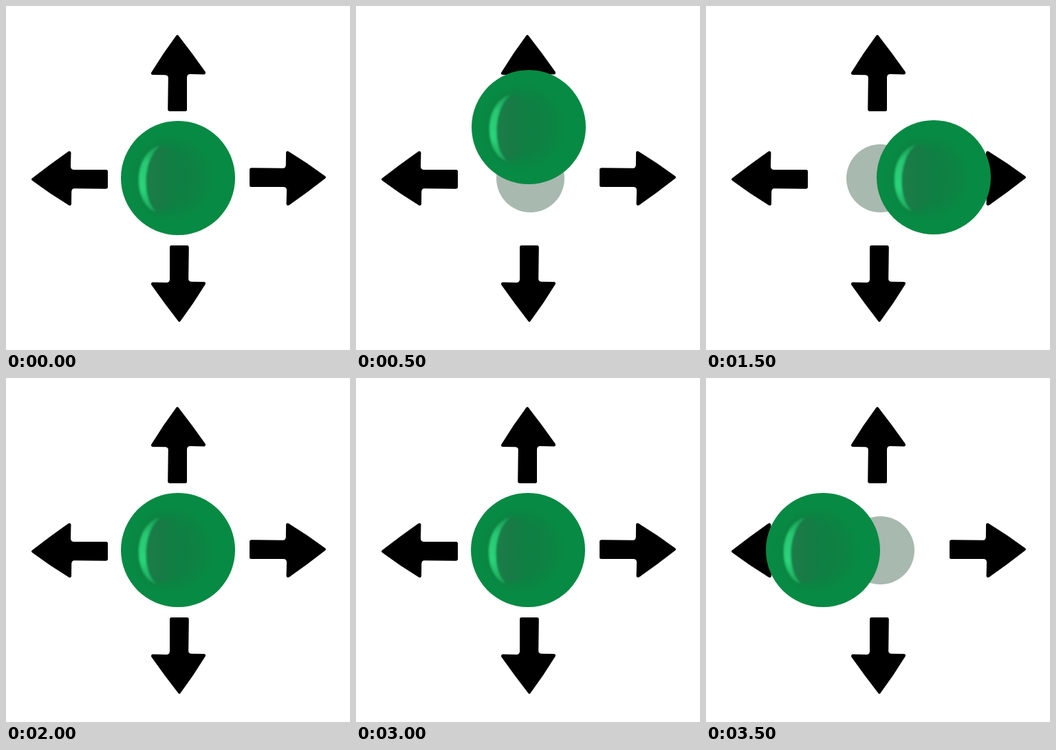
Write an HTML page that moves like this. It is 500 px wide and 500 px high and loops after 4 s.

```html
<!DOCTYPE html>
<html lang="en">
<head>
<meta charset="utf-8">
<title>Joystick</title>
<style>
  html, body { margin: 0; width: 100%; height: 100%; overflow: hidden; background: #fff; }
  svg { display: block; width: 100vw; height: 100vh; }
</style>
</head>
<body>
<svg viewBox="0 0 500 500">
  <defs>
    <path id="arrow" d="M247.6 42.8Q249 41 250.5 42.8Q271 69 289.6 95.5Q291 98.5 288 99.5L268 99Q263 99 263 104L263 150.5Q263 153 260.5 153L238 153Q235.2 153 235.2 150L235.8 104.5Q236 100.5 231 100.2L213 100Q210 99.5 211.3 96.5Q228 69 247.6 42.8Z"/>
    <radialGradient id="body">
      <stop offset="0" stop-color="#0f8042"/>
      <stop offset=".55" stop-color="#0e8143"/>
      <stop offset=".8" stop-color="#0a8643"/>
      <stop offset="1" stop-color="#078a43" stop-opacity="0"/>
    </radialGradient>
    <linearGradient id="shine" gradientUnits="userSpaceOnUse" x1="0" y1="202" x2="0" y2="300">
      <stop offset="0" stop-color="#20b063" stop-opacity=".6"/>
      <stop offset=".25" stop-color="#28c872"/>
      <stop offset=".65" stop-color="#2ad47a"/>
      <stop offset="1" stop-color="#22b868" stop-opacity=".7"/>
    </linearGradient>
    <linearGradient id="shade" gradientUnits="userSpaceOnUse" x1="200" y1="0" x2="262" y2="0">
      <stop offset="0" stop-color="#1b7d48"/>
      <stop offset=".45" stop-color="#187a45"/>
      <stop offset="1" stop-color="#0f8042" stop-opacity="0"/>
    </linearGradient>
    <filter id="soft" x="-50%" y="-20%" width="200%" height="140%" color-interpolation-filters="sRGB">
      <feGaussianBlur stdDeviation="1.7"/>
    </filter>
    <filter id="softer" x="-50%" y="-20%" width="200%" height="140%" color-interpolation-filters="sRGB">
      <feGaussianBlur stdDeviation="3.5"/>
    </filter>
  </defs>
  <rect width="500" height="500" fill="#fff"/>
  <use href="#arrow"/>
  <use href="#arrow" transform="translate(7 0) rotate(90 250 250)"/>
  <use href="#arrow" transform="translate(1 1) rotate(180 250 250)"/>
  <use href="#arrow" transform="translate(-5 1) rotate(270 250 250)"/>
  <circle cx="253.5" cy="250.5" r="49.5" fill="#a8b9af"/>
  <g id="ball">
    <circle cx="250" cy="250" r="83" fill="#078a43"/>
    <ellipse cx="240" cy="250" rx="66" ry="68" fill="url(#body)"/>
    <path d="M224 203C194 214 192 288 218 299Q262 292 262 250Q262 208 224 203Z" fill="url(#shade)" filter="url(#softer)"/>
    <path d="M224 203C184 212 183 288 218 299C197 280 199 222 224 203Z" fill="url(#shine)" filter="url(#soft)"/>
  </g>
</svg>
<script>
  const STEP = 500;
  const ball = document.getElementById('ball');
  const pushes = [[1, -74], [81, -1], [0, 74], [-80, 0]];

  // Rest and push alternate: up, right, down, left.
  function draw(ms) {
    const step = Math.floor(ms / STEP) % (pushes.length * 2);
    const [x, y] = step % 2 ? pushes[(step - 1) / 2] : [0, 0];
    ball.setAttribute('transform', `translate(${x} ${y})`);
  }

  function tick() {
    draw(performance.now());
    requestAnimationFrame(tick);
  }
  tick();
</script>
</body>
</html>
```
